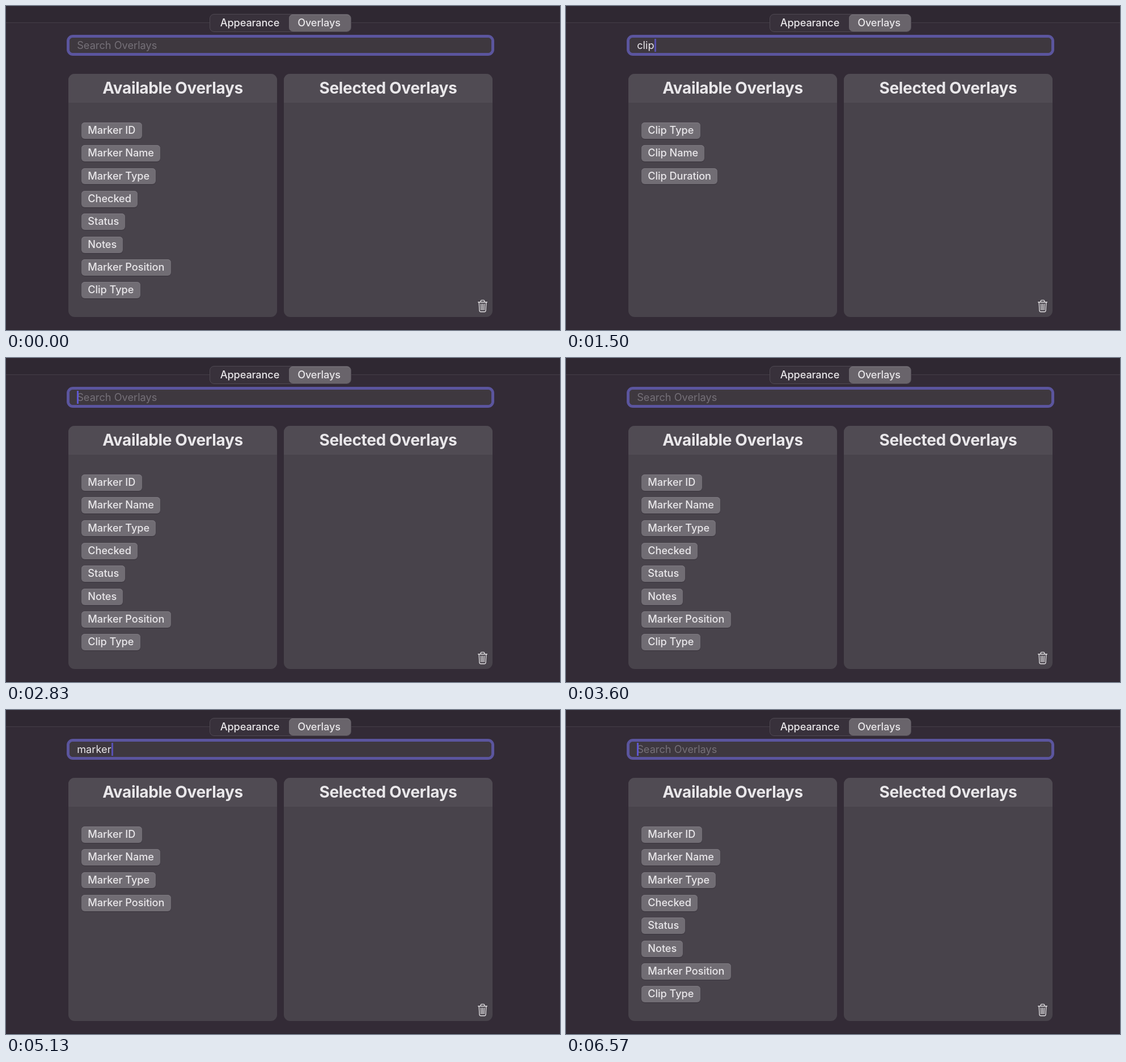
These frames come from a looping animation (977 by 573 pixels, 6.76 s). An HTML page:

```html
<!DOCTYPE html>
<html lang="en">
<head>
<meta charset="utf-8">
<title>Overlay search</title>
<style>
  html, body { margin: 0; width: 100%; height: 100%; overflow: hidden; background: #332b36; }
  body { position: relative; font: 18.2px Inter, "Open Sans", sans-serif; font-optical-sizing: none; color: #e9e7ea; }
  div, svg { position: absolute; box-sizing: border-box; white-space: pre; }
  .bar { left: 0; top: 0; width: 977px; height: 30px; background: #2f2832; border-bottom: 1px solid #453e48; }
  .edge { left: 0; top: 572px; width: 977px; height: 1px; background: #2a232c; }
  .tabs { left: 359px; top: 14px; width: 250px; height: 32px; border-radius: 8px; background: #38313b; border: 1px solid #4f4952; }
  .tab { top: 15px; height: 30px; line-height: 29px; text-align: center; font-weight: 500; letter-spacing: -.15px; }
  .on { left: 499px; width: 109px; padding-right: 3px; border-radius: 7px; background: #69646b; box-shadow: inset 0 1px #79747b; }
  .field { left: 107px; top: 50.5px; width: 754px; height: 37.5px; border: 5px solid #5b559e; border-radius: 11px; background: #3e383f; }
  .field::before { content: ""; position: absolute; inset: 0; border-radius: 6px; background: #3e383f; }
  .line { left: 125.2px; top: 58px; height: 23px; line-height: 23px; }
  #hint { color: #757078; }
  #caret { display: inline-block; width: 3px; height: 23px; background: #5e57d0; }
  .panel { top: 120px; width: 368px; height: 430px; border-radius: 11px; background: #48434b; overflow: hidden; }
  .head { left: 0; top: 0; width: 100%; height: 51px; line-height: 51px; background: #504b53;
    text-align: center; font-size: 28px; font-weight: 700; letter-spacing: -.36px; }
  .item { left: 133px; height: 28.8px; line-height: 27px; padding: 0 11.3px; border-radius: 6px;
    font-weight: 500; letter-spacing: -.08px;
    background: #716d74; box-shadow: inset 0 1px #7e7a81, 0 1px 1px #3a353d; }
</style>
</head>
<body>
<div class="bar"></div>
<div class="edge"></div>
<div class="tabs"></div>
<div class="tab" style="left:360px;width:140px">Appearance</div>
<div class="tab on">Overlays</div>
<div class="field"></div>
<div class="line" id="hint">Search Overlays</div>
<div class="line"><span id="query"></span><div id="caret"></div></div>
<div class="panel" style="left:110px"><div class="head">Available Overlays</div></div>
<div class="panel" style="left:490px"><div class="head">Selected Overlays</div></div>
<div id="list" style="left:0;top:0"></div>
<svg style="left:830px;top:518px" width="22" height="26" fill="none" stroke="#e3e1e4" stroke-width="1.4" stroke-linecap="round" stroke-linejoin="round">
  <path d="M2.7 5.7H18.3M7.2 5.7V4Q7.2 2.4 8.6 2.4H12.4Q13.8 2.4 13.8 4V5.7M4.2 5.7L5 21Q5.1 22.8 6.9 22.8H14.1Q15.9 22.8 16 21L16.8 5.7M7.6 9L8 19.4M10.5 9V19.4M13.4 9L13 19.4"/>
</svg>
<script>
const LOOP = 6760, STEP = 33.4, ROWS = 8;
const names = ["Marker ID", "Marker Name", "Marker Type", "Checked", "Status", "Notes", "Marker Position",
  "Clip Type", "Clip Name", "Clip Duration", "Icon Image", "Image Filename"];

// [time, text in the field]
const keys = [[0, ""], [430, "c"], [530, "cl"], [730, "cli"], [830, "clip"],
  [2330, "cli"], [2500, "cl"], [2670, "c"], [2830, ""],
  [3770, "m"], [3830, "ma"], [4070, "mar"], [4200, "mark"], [4300, "marke"], [4430, "marker"],
  [5770, "marke"], [5930, "mark"], [6070, "mar"], [6230, "ma"], [6400, "m"], [6570, ""]];

// caret fades: [start, end, visible afterwards]
const fades = [[0, 0, 0], [170, 300, 1], [1500, 1600, 0], [1830, 1970, 1], [3470, 3600, 0],
  [3770, 3770, 1], [5130, 5270, 0], [5470, 5570, 1]];

const $ = id => document.getElementById(id);
const latest = (list, t) => list.findLast(e => e[0] <= t);
let shown = null;

function search(text) {
  shown = text;
  $("query").textContent = text;
  $("hint").hidden = text !== "";
  const hits = names.filter(n => n.toLowerCase().includes(text)).slice(0, ROWS);
  $("list").innerHTML = hits.map((n, i) =>
    `<div class="item" style="top:${206 + i * 40.35}px">${n}</div>`).join("");
}

function caretAlpha(t) {
  const [start, end, visible] = latest(fades, t);
  const steps = Math.round((end - start) / STEP) + 1;
  const p = Math.min(1, (Math.floor((t - start + 3) / STEP) + 1) / steps);
  return visible ? p : 1 - p;
}

function draw() {
  const t = performance.now() % LOOP;
  const text = latest(keys, t)[1];
  if (text !== shown) search(text);
  $("caret").style.opacity = caretAlpha(t);
  requestAnimationFrame(draw);
}
draw();
</script>
</body>
</html>
```
